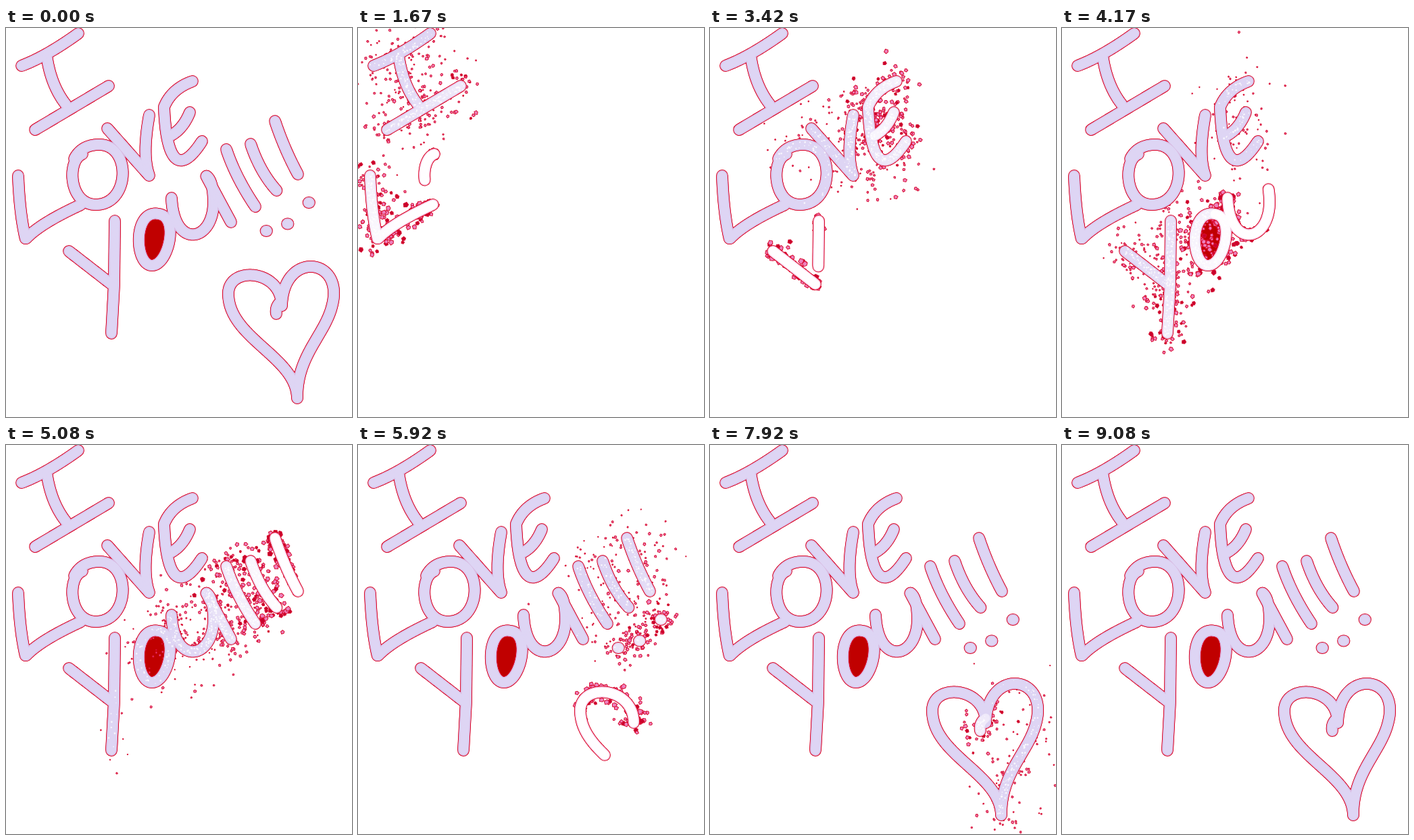
Write an HTML page with a canvas that moves like this. It is 512 px wide and 577 px high and loops after 9160 ms.

```html
<!DOCTYPE html>
<html>
<head>
<meta charset="utf-8">
<style>
  html, body { margin: 0; height: 100%; overflow: hidden; background: #fff; }
  canvas { display: block; }
</style>
</head>
<body>
<canvas id="stage" width="512" height="577"></canvas>
<script>
const ctx = document.getElementById('stage').getContext('2d');
const LOOP = 9160, STEP = 1000 / 12;
const LAVENDER = [222, 213, 244], WHITE = [255, 253, 255];
const strokes = [], sparks = [];

let seed = 71;
const random = () => (seed = (seed * 16807) % 2147483647) / 2147483647;
const clamp = v => Math.max(0, Math.min(1, v));
const mix = (a, b, k) => `rgb(${a.map((v, i) => Math.round(v + (b[i] - v) * k))})`;

// Writes a path at constant pen speed between two steps; returns its points.
function write(start, end, d) {
  const parts = d.split(/(?=M)/).map(part => {
    const path = document.createElementNS('http://www.w3.org/2000/svg', 'path');
    path.setAttribute('d', part);
    return path;
  });
  const total = parts.reduce((sum, path) => sum + path.getTotalLength(), 0);
  let written = 0;
  const points = parts.flatMap(path => {
    const length = path.getTotalLength(), count = Math.ceil(length / 2);
    const stroke = Array.from({ length: count + 1 }, (_, i) => {
      const { x, y } = path.getPointAtLength(length * i / count);
      const born = start + (end - start) * (written + length * i / count) / total;
      return addPoint(x, y, born, i % count === 0);
    });
    written += length;
    strokes.push(stroke);
    return stroke;
  });
  return points;
}

function addPoint(x, y, born, isEnd) {
  const specks = [0, 1].map(() => ({
    x: x + random() * 10 - 5, y: y + random() * 10 - 5,
    r: 0.5 + random(), life: 9 + random() * 11
  }));
  for (let k = random() < 0.6 ? 2 : 1; k > 0; k--) addSpark(x, y, born, 85);
  // The pen lingers at the ends and leaves a dense burst.
  if (isEnd) for (let k = 0; k < 14; k++) addSpark(x, y, born, 30);
  return { x, y, born, specks };
}

function addSpark(x, y, born, reach) {
  sparks.push({
    x, y, born: born + 0.8 + random(),
    angle: random() * Math.PI * 2, reach: 8 + reach * random() ** 1.8,
    size: 3.5 + random() * 4, life: 9 + random() * 9,
    turn: random() * 3, dark: random() < 0.25
  });
}

write(0, 7, 'M23 56Q60 42 107 8M60 40Q66 85 89 114M43 151L152 86');
write(8, 13.5, 'M18 219Q20 275 29 313Q50 290 111 262');
write(14, 20, 'M113 187C90 195 92 262 133 262C184 262 186 173 138 173Q112 173 101 194');
write(20.3, 25, 'M150 149L212 219Q201 190 212 129');
write(25.2, 31, 'M234 117C236 180 250 230 290 168M234 117Q245 90 276 79M272 125Q262 150 243 160');
write(33, 38, 'M93 331L156 380M161 286L160 380L156 453');
const bowl = write(38.5, 42, 'M226 276C188 268 190 350 215 352S257 280 226 276');
write(42.6, 46.6, 'M245 252C248 330 309 318 307 255Q306 225 296 219Q306 238 333 288');
for (let i = 0; i < 3; i++) {
  const x = 326 + 36 * i, y = 180 + 5 * i - 13 * i * i;
  const endX = 369 + 31.5 * i, endY = 265 - 24 * i;
  write(48.5 + 2.5 * i, 50 + 2.5 * i, `M${x} ${y}Q${x + 14} ${y + 42} ${endX} ${endY}`);
  write(56.5 + 1.7 * i, 56.7 + 1.7 * i, `M${384.5 + 31.5 * i} ${301 - 10.5 * i * i}h1.5`);
}
write(62.5, 68, 'M408 412C408 358 329 352 329 394C329 460 430 488 431 549');
write(69.5, 77.5, 'M408 412C410 330 500 340 483 410C473 455 430 485 431 549');
write(82, 83, 'M408 405Q398 412 400 424');

function drawSparks(step) {
  ctx.strokeStyle = '#d80c30';
  ctx.lineWidth = 1;
  for (const s of sparks) {
    const age = step - s.born;
    if (age < 0 || age > s.life) continue;
    const travel = 6 + s.reach * (1 - Math.exp(-age / 7));
    const size = s.size * (1 - 0.75 * age / s.life);
    ctx.save();
    ctx.translate(s.x + Math.cos(s.angle) * travel, s.y + Math.sin(s.angle) * travel);
    ctx.rotate(s.turn);
    ctx.beginPath();
    ctx.moveTo(-size * 0.6, -size * 0.2);
    ctx.lineTo(-size * 0.1, -size * 0.55);
    ctx.lineTo(size * 0.6, -size * 0.3);
    ctx.lineTo(size * 0.4, size * 0.45);
    ctx.lineTo(-size * 0.4, size * 0.5);
    ctx.closePath();
    ctx.fillStyle = s.dark && age < 7 ? '#c8002c' : '#ee80bc';
    ctx.fill();
    ctx.stroke();
    ctx.restore();
  }
}

function drawLayer(step, width, fresh, settled) {
  ctx.lineWidth = width;
  for (const points of strokes) {
    for (let i = 1; i < points.length; i++) {
      const a = points[i - 1], b = points[i];
      if (b.born > step) break;
      ctx.strokeStyle = mix(fresh, settled, clamp((step - b.born - 3) / 10));
      ctx.beginPath();
      ctx.moveTo(a.x, a.y);
      ctx.lineTo(b.x, b.y);
      ctx.stroke();
    }
  }
}

function drawSpecks(step) {
  ctx.fillStyle = 'rgba(255,255,255,.75)';
  for (const p of strokes.flat()) {
    if (p.born > step) continue;
    for (const s of p.specks) {
      if (step - p.born > s.life) continue;
      ctx.beginPath();
      ctx.arc(s.x, s.y, s.r, 0, 7);
      ctx.fill();
    }
  }
}

function draw(time) {
  const step = time < 80 ? 200 : Math.floor((time - 413) / STEP);
  ctx.fillStyle = '#fff';
  ctx.fillRect(0, 0, 512, 577);
  ctx.lineCap = 'round';
  if (step >= 42) {
    ctx.fillStyle = '#c00000';
    ctx.beginPath();
    bowl.forEach(p => ctx.lineTo(p.x, p.y));
    ctx.fill();
  }
  drawSparks(step);
  drawLayer(step, 17.8, [220, 8, 40], [220, 8, 40]);
  drawLayer(step, 15.8, [246, 205, 230], [217, 190, 228]);
  drawLayer(step, 13, WHITE, LAVENDER);
  drawSpecks(step);
}

function tick() {
  draw(performance.now() % LOOP);
  requestAnimationFrame(tick);
}
tick();
</script>
</body>
</html>
```
